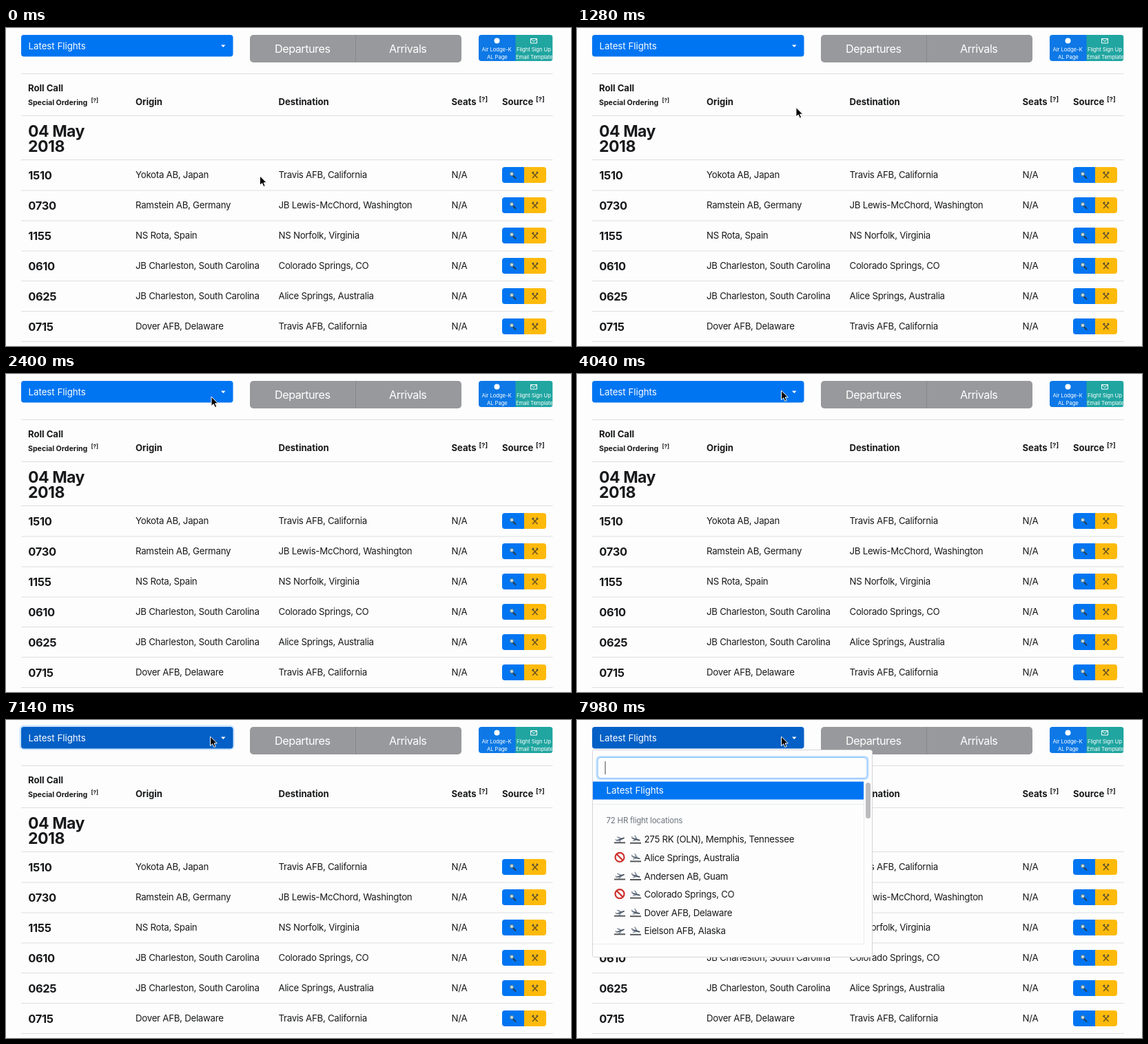
Animation, 820 px wide and 462 px high, one loop 8 s. Source, as an HTML page:

```html
<!DOCTYPE html>
<html lang="en">
<head>
<meta charset="utf-8">
<style>
  html, body { margin: 0; width: 100%; height: 100%; overflow: hidden; background: #fdfdfd; }
  svg { display: block; width: 820px; height: 462px; }
  text { font: 13.25px Inter, "Open Sans", sans-serif; letter-spacing: -.02em; fill: #18191b; white-space: pre; }
  .bold { font-size: 13.1px; font-weight: 700; letter-spacing: 0; }
  .day { font-size: 23px; font-weight: 700; letter-spacing: -.02em; }
  .time { font-size: 16.4px; font-weight: 700; letter-spacing: -.02em; }
  .small { font-size: 10.6px; font-weight: 700; letter-spacing: 0; }
  .sup { font-size: 9.6px; font-weight: 700; letter-spacing: 0; }
  .tiny { font-size: 8px; font-weight: 700; letter-spacing: 0; }
  .white { fill: #fff; letter-spacing: 0; }
  .tab { font-size: 16.2px; letter-spacing: -.03em; fill: #fff; }
  .note { font-size: 7.7px; letter-spacing: -.01em; fill: #fff; }
  .group { font-size: 11.5px; fill: #6c757d; }
</style>
</head>
<body>
<svg viewBox="0 0 820 462">
  <defs>
    <clipPath id="linksClip"><rect x="686" y="10" width="107.5" height="38" rx="4"/></clipPath>
    <g id="sourceButtons">
      <path d="M32 0H4Q0 0 0 4V19Q0 23 4 23H32Z" fill="#0075f2"/>
      <path d="M32 0H60Q64 0 64 4V19Q64 23 60 23H32Z" fill="#fdba0a"/>
      <path d="M16 12.500L19.500 16" stroke="#263c50" stroke-width="2" stroke-linecap="round"/>
      <circle cx="14" cy="10" r="2.700" fill="#b8d8e4" stroke="#54758c" stroke-width="1"/>
      <path d="M44 8L51.500 16M51.500 8L44 16" stroke="#6c5420" stroke-width="1.500"/>
      <path d="M43.500 9L46 7M50 7L52 9" stroke="#4c4c44" stroke-width="1.800"/>
    </g>
    <g id="plane">
      <path d="M-7 0L-5.500 -.5L-4 1L0 0L-4 -3.500L-2.500 -4L3 -.8L6 -1.500Q8 -1.500 7 0L2 2L-1 5H-2.500L-1 2L-5 2.500Z" fill="#8794a2"/>
      <path d="M-4 1.700L6.500 -.5" stroke="#3c4652" stroke-width="1.200"/>
    </g>
    <g id="takeoff"><use href="#plane" transform="rotate(-8)"/><path d="M-8 5.500H8" stroke="#55575a" stroke-width="2"/></g>
    <g id="landing"><use href="#plane" transform="translate(0 -1) rotate(28)"/><path d="M-8 5.500H8" stroke="#55575a" stroke-width="2"/></g>
    <g id="closed" fill="none" stroke="#cc2f2c" stroke-width="2.200"><circle r="6.500"/><path d="M-4.600 -4.600L4.600 4.600"/></g>
  </defs>

  <rect width="820" height="462" fill="#fdfdfd"/>
  <g id="table"></g>

  <rect id="buttonRing" x="19.500" y="7.500" width="312" height="36" rx="6" fill="#80bdff"/>
  <rect id="button" x="22" y="10" width="307.500" height="31.500" rx="4"/>
  <text class="white" x="32.500" y="30.700">Latest Flights</text>
  <path d="M312 24.500H318.500L315.250 28Z" fill="#fff"/>

  <rect x="354" y="10" width="307" height="40" rx="5" fill="#98999c"/>
  <path d="M507.500 10V50" stroke="#86888b"/>
  <text class="tab" x="390" y="36">Departures</text>
  <text class="tab" x="556" y="36">Arrivals</text>

  <g clip-path="url(#linksClip)">
    <rect x="686" y="10" width="54" height="38" fill="#0d78e6"/>
    <rect x="739.500" y="10" width="54" height="38" fill="#20a5a0"/>
    <circle cx="712.500" cy="18.500" r="4" fill="#fff"/>
    <path d="M761.500 15.500H770.500V22H761.500ZL766 19.500L770.500 15.500" fill="none" stroke="#fff"/>
    <text class="note" x="690.500" y="34">Air Lodge-K</text>
    <text class="note" x="698" y="45">AL Page</text>
    <text class="note" x="741" y="34">Flight Sign Up</text>
    <text class="note" x="740" y="45">Email Template</text>
  </g>

  <g id="menu">
    <rect x="22.500" y="43.500" width="406" height="301" rx="3" fill="#fdfdfd" stroke="#d4d5d8"/>
    <rect id="inputRing" x="27.500" y="52" width="396" height="35" rx="6" fill="#80bdff"/>
    <rect id="input" x="30" y="54.500" width="391" height="30" rx="4" fill="#fdfdfd"/>
    <path d="M41 60V79" stroke="#444448"/>
    <rect x="23" y="89.500" width="393" height="26" fill="#0075f2"/>
    <text class="white" x="42.500" y="107">Latest Flights</text>
    <path d="M23 122.500H416M416.500 116V325M23 325.500H416" fill="none" stroke="#e9ebee"/>
    <text class="group" x="42.500" y="149.500">72 HR flight locations</text>
    <rect x="419" y="91" width="7" height="52" rx="3.500" fill="#bcbcbe"/>
  </g>

  <path id="cursor" d="M0 0V13.500L3.200 10.600L5.400 15.500L7.700 14.500L5.600 9.800H9.800Z"
        fill="#000" stroke="#fff" stroke-width="1"/>
</svg>
<script>
const LOOP = 8000;
const $ = id => document.getElementById(id);

function add(parent, tag, attributes, content = '') {
  const node = document.createElementNS('http://www.w3.org/2000/svg', tag);
  for (const key in attributes) node.setAttribute(key, attributes[key]);
  node.textContent = content;
  parent.append(node);
}
const write = (parent, x, y, content, style = '') => add(parent, 'text', { x, y, class: style }, content);

const table = $('table');
for (const y of [66.5, 127.5, 191.5, 236, 280, 324, 367.5, 411.5, 455.5])
  add(table, 'path', { d: `M22 ${y}H793.5`, stroke: '#dbdee1' });

write(table, 32, 92, 'Roll Call', 'bold');
write(table, 32, 111.5, 'Special Ordering', 'small');
write(table, 123.5, 107.5, '[?]', 'tiny');
write(table, 188, 112, 'Origin', 'bold');
write(table, 395.5, 112, 'Destination', 'bold');
write(table, 646.5, 112, 'Seats', 'bold');
write(table, 686.5, 107, '[?]', 'sup');
write(table, 720, 112, 'Source', 'bold');
write(table, 769, 107, '[?]', 'sup');
write(table, 32, 158, '04 May', 'day');
write(table, 32, 180, '2018', 'day');

[
  ['1510', 'Yokota AB, Japan', 'Travis AFB, California'],
  ['0730', 'Ramstein AB, Germany', 'JB Lewis-McChord, Washington'],
  ['1155', 'NS Rota, Spain', 'NS Norfolk, Virginia'],
  ['0610', 'JB Charleston, South Carolina', 'Colorado Springs, CO'],
  ['0625', 'JB Charleston, South Carolina', 'Alice Springs, Australia'],
  ['0715', 'Dover AFB, Delaware', 'Travis AFB, California'],
].forEach(([time, origin, destination], i) => {
  const y = 217.5 + 44 * i;
  write(table, 32.3, y + 2.7, time, 'time');
  write(table, 188, y, origin);
  write(table, 395.5, y, destination);
  write(table, 646.5, y, 'N/A');
  add(table, 'use', { href: '#sourceButtons', x: 720, y: y - 15.5 });
});

[
  ['275 RK (OLN), Memphis, Tennessee', 'takeoff'],
  ['Alice Springs, Australia', 'closed'],
  ['Andersen AB, Guam', 'takeoff'],
  ['Colorado Springs, CO', 'closed'],
  ['Dover AFB, Delaware', 'takeoff'],
  ['Eielson AFB, Alaska', 'takeoff'],
].forEach(([place, departure], i) => {
  const y = 178.3 + 26.6 * i;
  add($('menu'), 'use', { href: '#' + departure, x: 62, y: y - 5.5 });
  add($('menu'), 'use', { href: '#landing', x: 85, y: y - 5 });
  write($('menu'), 97.5, y, place);
});

// Pointer path: time, x, y
const path = [[0, 368.5, 215], [1280, 318, 115.5], [2400, 298, 33], [2820, 296.5, 24]];

const progress = (t, from, to) => Math.min(1, Math.max(0, (t - from) / (to - from)));
const smooth = p => p * p * (3 - 2 * p);
const mix = (a, b, p) => a + (b - a) * p;
const mixColor = (a, b, p) => `rgb(${a.map((v, i) => Math.round(mix(v, b[i], p)))})`;

function pointerAt(t) {
  const next = path.findIndex(point => point[0] > t);
  const end = next < 0 ? path.length - 1 : next;
  const [a, b] = [path[end - 1], path[end]];
  const p = progress(t, a[0], b[0]);
  return [mix(a[1], b[1], p), mix(a[2], b[2], p)];
}

function draw(now) {
  const t = now % LOOP;
  $('cursor').setAttribute('transform', `translate(${pointerAt(t)})`);

  const press = smooth(progress(t, 6720, 7040));
  const focus = smooth(progress(t, 7460, 7900));
  $('button').setAttribute('fill', mixColor([0, 117, 242], [4, 96, 198], press));
  $('buttonRing').setAttribute('opacity', 0.4 * press * (1 - progress(t, 7240, 7400)));
  $('menu').setAttribute('visibility', t >= 7240 ? 'visible' : 'hidden');
  $('inputRing').setAttribute('opacity', 0.45 * focus);
  $('input').setAttribute('stroke', mixColor([212, 214, 220], [128, 189, 255], focus));
  requestAnimationFrame(draw);
}
draw(performance.now());
</script>
</body>
</html>
```
